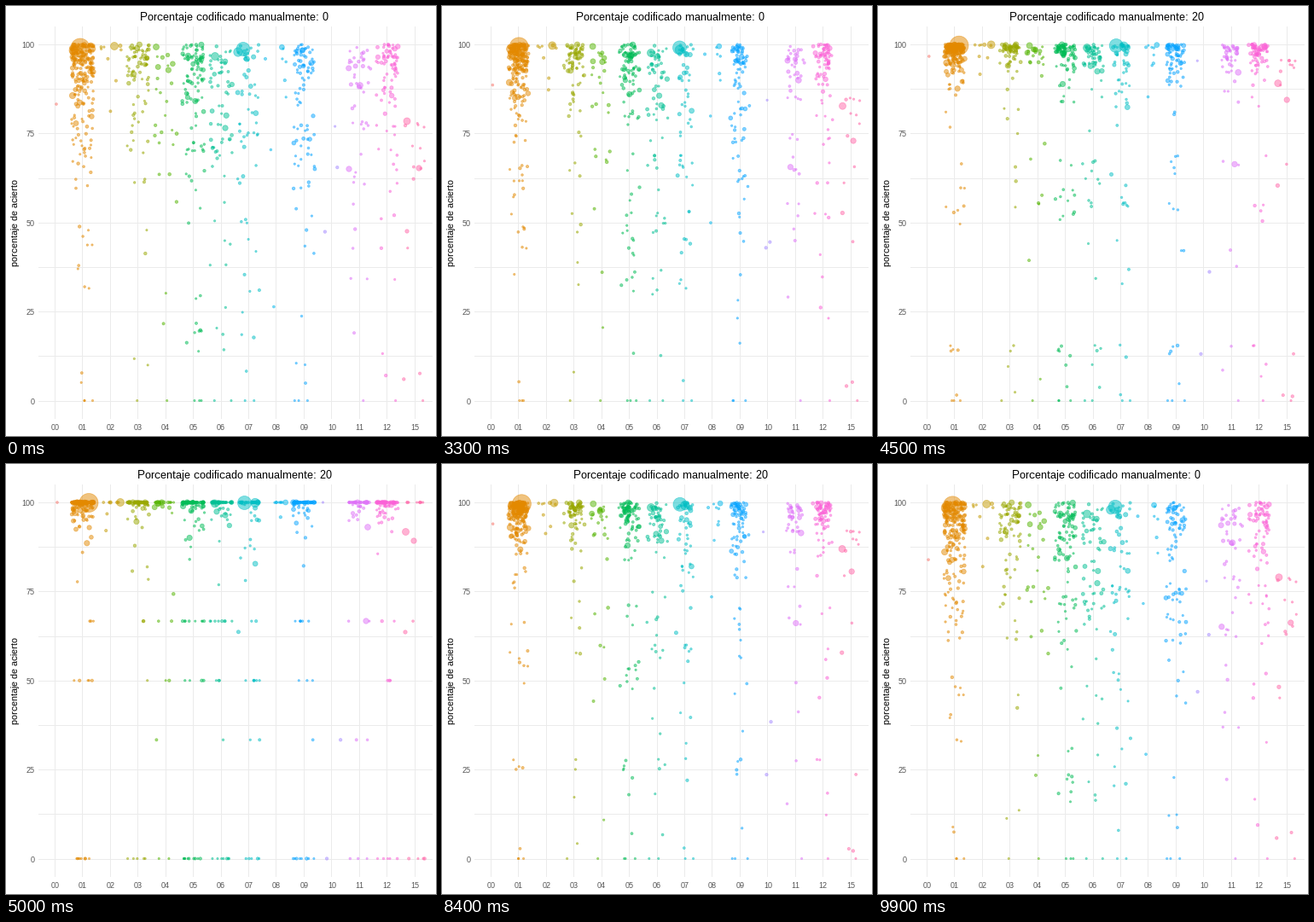
A matplotlib script for the animation above (10000 ms loop, 504 by 504 pixels).

```python
import numpy as np
import matplotlib.pyplot as plt
from matplotlib.animation import FuncAnimation

SIZE, DPI = 504, 72
STEPS, STEP_MS = 100, 100
X0, DX = 57.33, 32.45         # first column, column spacing
Y0, PCT = 462.5, 4.175        # zero line, pixels per percent
JITTER = 13
TINY = 1.15                   # smallest radius

# label, colour, well coded points, their mean miss in percent, rare points
COLUMNS = [
    ("00", "#F8766D", 0, 0, 0),
    ("01", "#E38900", 205, 7.5, 30),
    ("02", "#C49A00", 8, 8, 0),
    ("03", "#99A800", 72, 8.5, 9),
    ("04", "#53B400", 17, 14, 8),
    ("05", "#00BC56", 82, 12, 24),
    ("06", "#00C094", 42, 15, 22),
    ("07", "#00BFC4", 36, 12, 20),
    ("08", "#00B6EB", 7, 8, 2),
    ("09", "#06A4FF", 62, 12, 26),
    ("10", "#A58AFF", 0, 0, 3),
    ("11", "#DF70F8", 30, 13, 15),
    ("12", "#FB61D7", 70, 8.5, 13),
    ("15", "#FF66A8", 0, 0, 13),
]

# Largest circles: x, y before, x, y after, radius
KEY = [
    (87, 49, 97, 45.5, 11), (79, 52, 84, 47, 5), (78, 105, 81, 57, 3.6),
    (59, 115, 60, 45, 1.4), (127, 47, 134, 45, 4.5), (176, 48, 178, 46, 3.5),
    (245, 59, 245, 46.5, 4.5), (257, 143, 257, 60, 3.2),
    (278, 50.5, 279.5, 45.5, 8), (272, 54, 292, 45.5, 5.2),
    (402, 191, 422, 184, 3.2), (415, 93, 424, 74, 3.4),
    (470, 135, 468.5, 79.5, 4), (484, 190, 478, 90, 3.2),
    (470, 264, 468, 197, 2.2),
]

plt.rcParams.update({"font.family": "Liberation Sans",
                     "text.hinting": "native", "text.hinting_factor": 1})
rng = np.random.default_rng(7)


def level(miss):
    return Y0 - PCT * (100 - miss)


def scatter_column(mid, n, mean, rare):
    """Rows of x, y before, x, y after, radius for one column."""
    # Many cases: close to 100, over half of them perfect afterwards
    before = rng.exponential(mean, n) % 42
    after = before * rng.random(n) ** 1.3 * (rng.random(n) < 0.4)
    radius = TINY + np.minimum(rng.exponential(0.55, n), 2)
    # Few cases: low at first, then a simple fraction
    low = 22 + 74 * rng.random(rare) ** 1.7
    part = rng.choice([0, 100 / 3, 50, 200 / 3, 100], rare,
                      p=[0.37, 0.21, 0.14, 0.06, 0.22])
    low_radius = TINY + 0.7 * rng.random(rare) ** 2
    # Never right
    none = np.full(rare // 8, 100.0)

    y = level(np.r_[before, low, none])
    y_end = level(np.r_[after, part, none])
    r = np.r_[radius, low_radius, TINY + 0 * none]
    x, x_end = mid + rng.uniform(-JITTER, JITTER, (2, len(y)))
    return np.c_[x, y, x_end, y_end, r]


fig = plt.figure(figsize=(SIZE / DPI, SIZE / DPI), dpi=DPI, facecolor="white")
ax = fig.add_axes([0, 0, 1, 1])
ax.set_xlim(0, SIZE)
ax.set_ylim(SIZE, 0)
ax.axis("off")

# Grid and labels
left, right = X0 - 0.6 * DX, X0 + 13.6 * DX
top, bottom = level(-5), level(105)
grid = dict(color="#EBEBEB", lw=1, zorder=1)
tick = dict(size=9, color="#4D4D4D", va="baseline")
for i, column in enumerate(COLUMNS):
    x = X0 + i * DX
    ax.plot([int(x)] * 2, [top, bottom], **grid)
    ax.text(x, 497, column[0], ha="center", **tick)
for k in range(9):
    y = Y0 + 0.1 - 12.5 * k * PCT
    ax.plot([left, right], [y, y], **grid)
    if k % 2 == 0:
        ax.text(33.5, y + 4, f"{12.5 * k:.0f}", ha="right", **tick)
ax.text(16, 254, "porcentaje de acierto", size=11, rotation=90,
        ha="right", va="center")
title = ax.text(267.5, 17, "", size=13, ha="center", va="baseline")

# Points
hues = [column[1] for column in COLUMNS]
rows = [np.array(KEY)]
tints = [hues[round((mark[0] - X0) / DX)] for mark in KEY]
for i, (_, hue, n, mean, rare) in enumerate(COLUMNS):
    rows.append(scatter_column(X0 + i * DX, n, mean, rare))
    tints += [hue] * len(rows[-1])
data = np.vstack(rows)
start, end, radius = data[:, :2], data[:, 2:4], data[:, 4]
dots = ax.scatter(*start.T, s=(2 * radius) ** 2, c=tints, edgecolors=tints,
                  linewidths=0.75, alpha=0.5, zorder=2)


def draw(k):
    p = np.interp(k, [0, 25, 50, 75, 100], [0, 0, 1, 1, 0])
    dots.set_offsets(start + (end - start) * p)
    title.set_text(f"Porcentaje codificado manualmente: {20 if p > 0.5 else 0}")
    return dots, title


anim = FuncAnimation(fig, draw, frames=STEPS, interval=STEP_MS, repeat=True)
plt.show()
```
